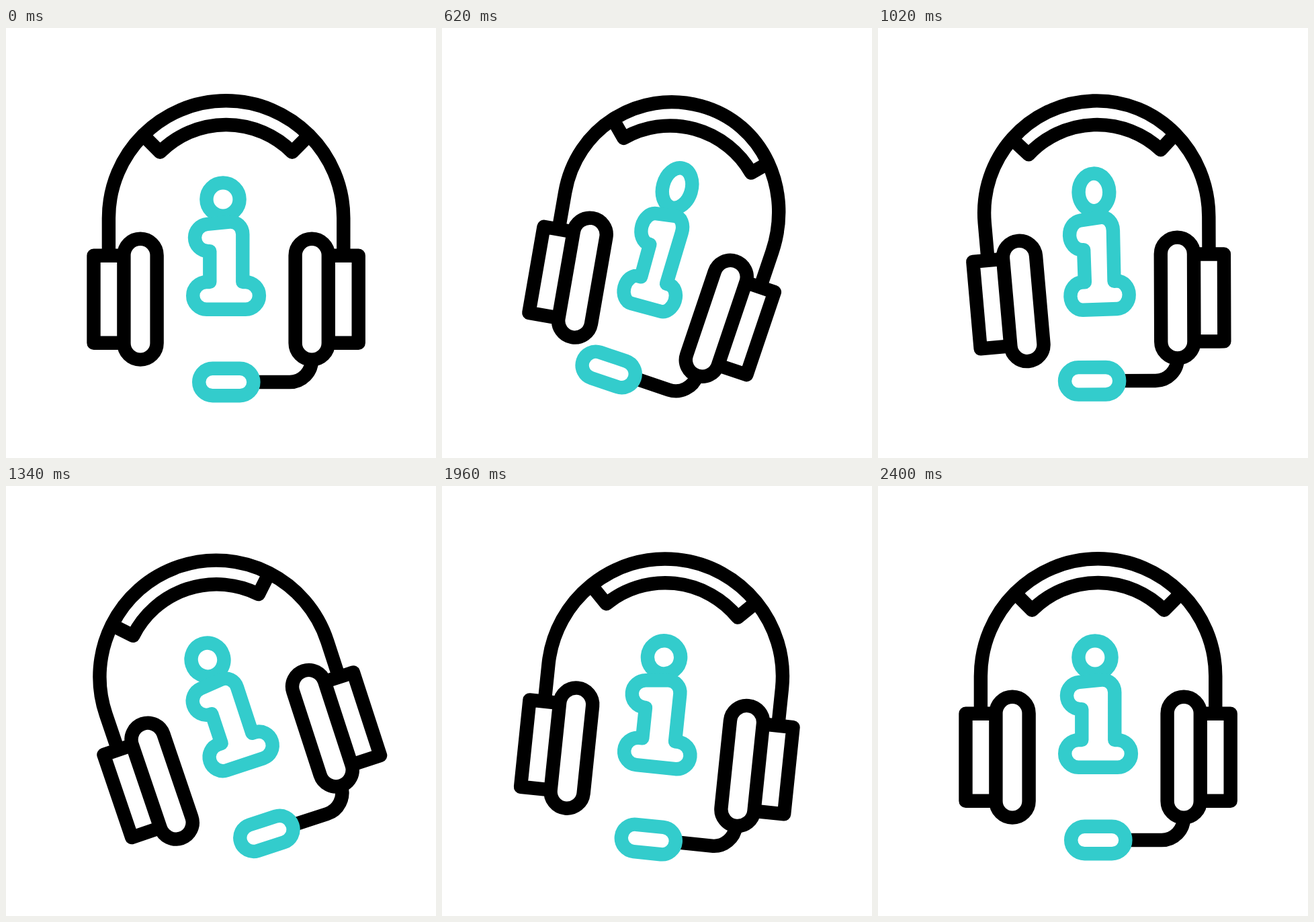
An HTML page that plays this animation: 640x640 px, repeating every 2420 ms.

```html
<!DOCTYPE html>
<html lang="en">
<head>
<meta charset="utf-8">
<title>Support headset</title>
<style>
  html, body { margin: 0; width: 100%; height: 100%; overflow: hidden; background: #fff; }
  svg { display: block; width: 100vw; height: 100vh; }
  g { fill: none; stroke-width: 20.4; stroke-linejoin: round; }
  .ink { stroke: #000; }
  .accent { stroke: #33cccc; }
</style>
</head>
<body>
<svg viewBox="0 0 640 640">
  <g id="body">
    <g class="ink">
      <path id="band"/>
      <path id="pad"/>
    </g>
    <g id="left" class="ink">
      <path d="M175.4 338.8 H130.5 V468.8 H175.4"/>
      <rect x="175.4" y="313.8" width="49.2" height="179.8" rx="24.6"/>
    </g>
    <g id="right">
      <g class="ink">
        <path d="M479.8 338.8 H524.7 V468.8 H479.8"/>
        <rect x="430.6" y="313.8" width="49.2" height="179.8" rx="24.6"/>
        <path d="M455.2 493.6 A33 33.4 0 0 1 422.2 527 H368.5"/>
      </g>
      <g class="accent">
        <rect x="287.2" y="506.8" width="81.2" height="40.5" rx="20.25"/>
      </g>
    </g>
    <g class="accent">
      <path id="dot"/>
      <path id="stem"/>
    </g>
  </g>
</svg>
<script>
const LOOP = 2420, CX = 327.6, CY = 328;
const el = id => document.getElementById(id);

// [time in ms, value], eased between neighbours
const TILT = [[0, 0], [600, 15.3], [1450, -19.9], [1500, -20], [2100, 10], [2400, 0]];
const SQUEEZE = [[0, 0], [600, 1], [1500, 0]];

function ease(keys, t) {
  for (let i = 1; i < keys.length; i++) {
    const [t0, a] = keys[i - 1], [t1, b] = keys[i];
    if (t < t1) {
      const x = (t - t0) / (t1 - t0);
      return a + (b - a) * x * x * (3 - 2 * x);
    }
  }
  return keys[keys.length - 1][1];
}

// ear cups: centre, turn and shift at full squeeze
const CUPS = {
  left: { x: 200, y: 403.7, turn: -5.4, dx: 24.6, dy: -2.4 },
  right: { x: 455.2, y: 403.7, turn: 3.4, dx: -22.4, dy: 3.7 }
};

function moveCup(c, q, x, y) {
  const a = c.turn * q * Math.PI / 180, s = Math.sin(a), k = Math.cos(a);
  x -= c.x;
  y -= c.y;
  return [c.x + c.dx * q + x * k - y * s, c.y + c.dy * q + x * s + y * k];
}

function cupTransform(c, q) {
  return `translate(${c.dx * q} ${c.dy * q}) rotate(${c.turn * q} ${c.x} ${c.y})`;
}

// two quarter arcs that meet at the crown and follow the cups
function bandPath(q) {
  const top = 108.3, h = 96.5;
  const l = y => moveCup(CUPS.left, q, 152.9, y);
  const r = y => moveCup(CUPS.right, q, 502.3, y);
  return `M${l(339)} L${l(283)} C${l(283 - h)} ${[CX - h, top]} ${[CX, top]}` +
    ` C${[CX + h, top]} ${r(283 - h)} ${r(283)} L${r(339)}`;
}

function padPath(q) {
  const d = 123.6 - 5 * q, y = 283 - d;
  return `M${CX - d} ${y} L229.3 184.7 A139 139 0 0 1 425.9 184.7 L${CX + d} ${y}`;
}

const DOT = "M323,230.4 C336.6,230.4 347.6,241.4 347.6,255 C347.6,268.6 336.6,279.6 323,279.6" +
  " C309.4,279.6 298.4,268.6 298.4,255 C298.4,241.4 309.4,230.4 323,230.4 Z";
const STEM = "M303.3,378.1 L298.5,378.1 C287.3,378.1 278.2,387.2 278.2,398.4" +
  " C278.2,409.6 287.3,418.7 298.5,418.7 L356.6,418.7" +
  " C367.8,418.7 376.9,409.6 376.9,398.4 C376.9,387.2 367.8,378.1 356.6,378.1" +
  " L352.3,378.1 L352.3,307 C352.3,296 343.5,287.6 332.5,288.7" +
  " L299.5,291.9 C289,293 281,301.5 281,312 C281,323.2 290,332.3 301.2,332.3 L303.3,332.3 Z";

// narrower towards the foot, taller towards the head
function pinch(path, q) {
  return path.replace(/([\d.]+),([\d.]+)/g, (m, px, py) => {
    const up = (398 - py) / 143;
    const x = CX + (px - CX) * (1 - q * (0.21 - 0.08 * up)) + 2 * q * up;
    const y = 398 + (py - 398) * (1 + q * (0.035 + 0.1 * up));
    return x.toFixed(2) + "," + y.toFixed(2);
  });
}

function draw(t) {
  const q = ease(SQUEEZE, t);
  el("body").setAttribute("transform", `rotate(${ease(TILT, t)} ${CX} ${CY})`);
  for (const side in CUPS) el(side).setAttribute("transform", cupTransform(CUPS[side], q));
  el("band").setAttribute("d", bandPath(q));
  el("pad").setAttribute("d", padPath(q));
  el("dot").setAttribute("d", pinch(DOT, q));
  el("stem").setAttribute("d", pinch(STEM, q));
}

const start = performance.now();
function tick() {
  draw((performance.now() - start) % LOOP);
  requestAnimationFrame(tick);
}
draw(0);
requestAnimationFrame(tick);
</script>
</body>
</html>
```
